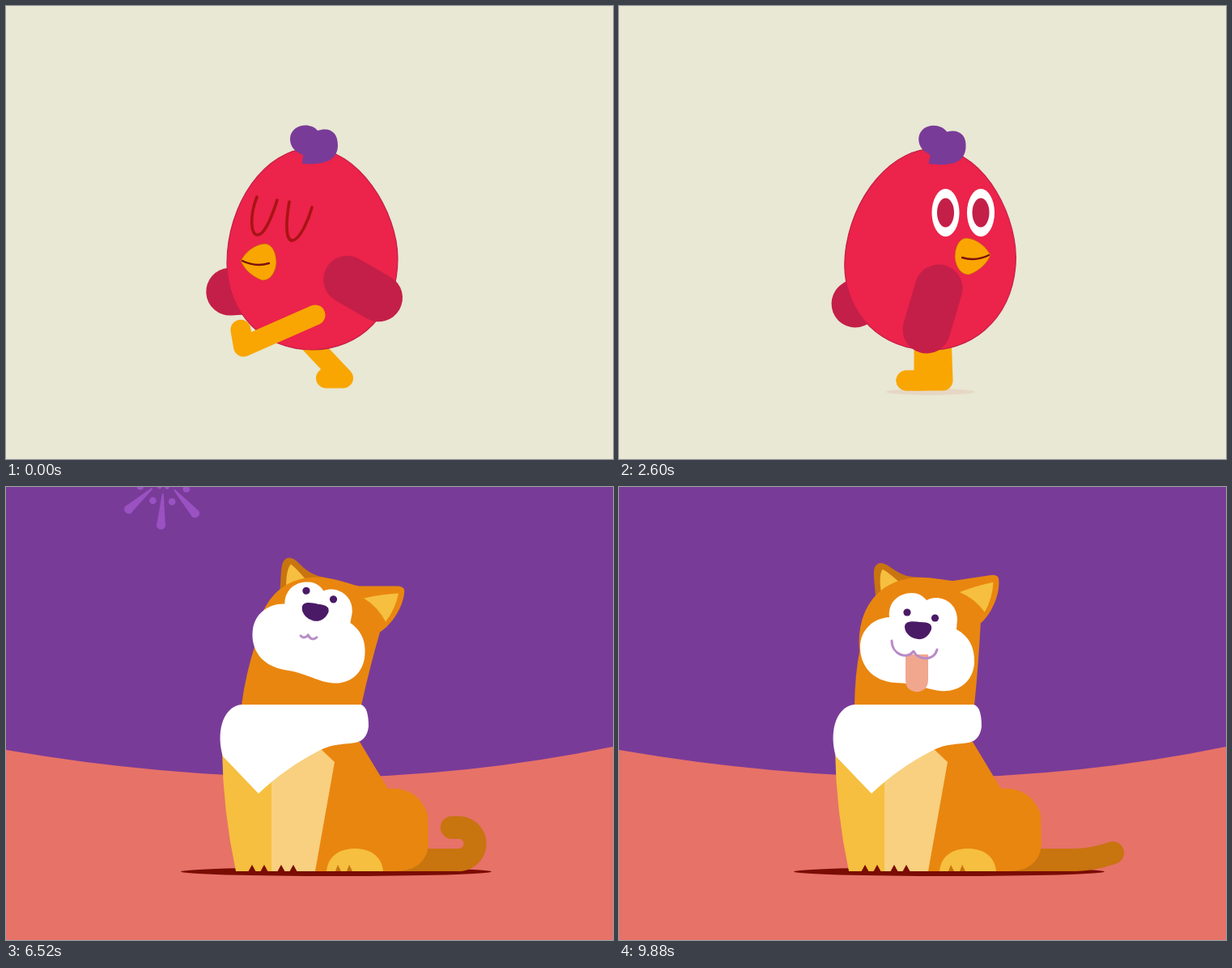
An HTML page with a canvas that plays this animation: 750 by 560 pixels, repeating every 9920 ms.

```html
<!DOCTYPE html>
<html lang="en">
<head>
<meta charset="utf-8">
<title>Bird and dog</title>
<style>
html, body { margin: 0; width: 100%; height: 100%; overflow: hidden; background: #e8e8d4; }
canvas { display: block; }
</style>
</head>
<body>
<canvas id="stage" width="750" height="560"></canvas>
<script>
const LOOP = 9920, STEP = 40, TAU = Math.PI * 2;
const { sin, cos, min, max, abs, sqrt, PI } = Math;
const ctx = document.getElementById('stage').getContext('2d');
const C = {
  cream: '#e8e8d4', red: '#ec234a', wine: '#c41f48', yellow: '#f9a602', purple: '#793b98',
  line: '#a81414', coral: '#e77268', orange: '#e9860f', brown: '#c8740f', gold: '#f6bf3f',
  sand: '#f8d07f', blood: '#7a0c04', spark: '#9a52c2', plum: '#4a1a66', pink: '#f1a78d',
  drop: '#6a2088'
};

const clamp = v => max(0, min(1, v));
const lerp = (a, b, k) => a + (b - a) * k;
const mix = (a, b, k) => a.map((v, i) => lerp(v, b[i], k));
const span = (t, a, b) => clamp((t - a) / (b - a));
function ease(t, a, b) {
  const k = span(t, a, b);
  return k * k * (3 - 2 * k);
}
// Goes from 0 to 1 with a damped overshoot, starting at time a.
function spring(t, a) {
  const d = t - a;
  return d < 0 ? 0 : 1 - Math.exp(-d / 110) * cos(d / 80);
}

function fill(color, d) {
  ctx.fillStyle = color;
  ctx.fill(new Path2D(d));
}
function stroke(color, width, d) {
  ctx.strokeStyle = color;
  ctx.lineWidth = width;
  ctx.stroke(new Path2D(d));
}
function oval(color, x, y, rx, ry = rx) {
  ctx.fillStyle = color;
  ctx.beginPath();
  ctx.ellipse(x, y, max(0, rx), max(0, ry), 0, 0, TAU);
  ctx.fill();
}
function group(draw) {
  ctx.save();
  draw();
  ctx.restore();
}
function turn(x, y, deg, sx = 1, sy = 1) {
  ctx.translate(x, y);
  ctx.rotate(deg * PI / 180);
  ctx.scale(sx, sy);
  ctx.translate(-x, -y);
}

/* Bird */

// Ankle and toe of a walking leg; phase 0 is the heel strike.
function stride(phase) {
  const a = TAU * phase, c = cos(a), s = sin(a), c2 = cos(2 * a);
  const x = 364 - 61.5 * c + 8 * s - 9 * c2;
  const y = min(463, 438 - 19.5 * c + 27.5 * s + 2.5 * c2);
  const lift = max(0, -s);
  const toe = PI + 1.4 * max(0, c) ** 4 - 3 * lift * lift, len = 21 - 6 * lift;
  return { lift, foot: [x, y, x + len * cos(toe), y + len * sin(toe)] };
}

function birdPose(t) {
  const p = min(t, 1280) / 640, w = cos(TAU * p - .48);
  const near = stride(p), far = stride(p + .5);
  const stand = ease(t, 1280, 1480), back = spring(t, 3160);
  const wind = sin(PI * span(t, 1280, 1960)), side = 1 - 2 * back;
  const rot = cos(2 * TAU * p) - 1 + 5 * spring(t, 1800) - 10 * back - 12 * wind;
  const angle = .96 - .49 * w, reach = 52 - 8 * w;
  const sx = 411 + 12 * w, sy = 343.5 - 6 * w;
  return {
    rot, dx: -.7 * rot, bob: -5 * sin(2 * TAU * p),
    face: -1 + 2 * ease(t, 1760, 2000) - 2 * ease(t, 3160, 3400),
    open: span(t, 1640, 1800),
    near: mix([382 + 10 * near.lift, 382 + 15 * near.lift, ...near.foot],
      [398, 405, 400, 463, 355, 463], stand),
    far: mix([362, 402, ...far.foot], [377, 405, 377, 463, 355, 463], stand),
    wing: mix([sx, sy, sx + reach * cos(angle), sy + reach * sin(angle)],
      [375 + 20 * side, 349, 375 + 5 * side, 400], stand),
    back: mix([324, 350, 303 - 29.6 * w, 392.5 - 44.4 * w],
      [375 - 55 * side, 350, 375 - 83 * side - 50 * wind, 368 - 106 * wind], stand)
  };
}

const leg = ([hx, hy, ax, ay, tx, ty]) =>
  stroke(C.yellow, 25, `M${hx} ${hy}L${ax} ${ay}L${tx} ${ty}`);
const wing = ([ax, ay, bx, by]) => stroke(C.wine, 59, `M${ax} ${ay}L${bx} ${by}`);

function birdFace(p) {
  const lean = p.rot - 5 * p.face * p.open;
  group(() => {
    ctx.translate(374.5 + lean * 2, p.face * lean * 1.3 + p.bob - 7 * p.open);
    ctx.scale(-p.face, 1);
    ctx.translate(-374.5, 0);
    if (p.open > 0) {
      for (const x of [302, 345.5]) {
        oval('#fff', x, 262.5, 17, 29.5 * p.open);
        oval(C.wine, x, 262.5, 10.5, 18 * p.open);
      }
    } else {
      stroke(C.line, 3.6, 'M310 236C300 262 303 283 311 283C320 283 330 256 335 240' +
        'M350 242C345 272 346 290 354 290C363 289 374 264 378 249');
    }
    const beak = 'M290 315C296 303 310 293 322 294C332 297 334 310 334 318' +
      'C333 330 326 340 316 339C303 334 294 325 290 315Z';
    fill(C.yellow, beak);
    stroke('#c8571c', .8, beak);
    stroke('#7a1010', 2.4, 'M292 315Q308 323 325 318');
  });
}

function bird(t) {
  const p = birdPose(t), striding = t < 1400;
  const swell = ease(t, 4720, 4960), tense = span(t, 4200, 4700);
  const squeeze = .07 * sin(span(t, 4200, 4720) * TAU);
  const sx = 1 + .48 * swell + squeeze, sy = 1 + .12 * swell - squeeze;
  if (t >= 200) oval('rgba(230,200,184,.5)', 385, 477, 55, 4);
  group(() => {
    turn(380, 425, 0, lerp(1, sx, .3), 1);
    leg(p.far);
    if (!striding) leg(p.near);
  });
  group(() => {
    ctx.translate(sin(t / 13) * 3 * tense - 9 * swell, 0);
    turn(380, 425, 0, sx, sy);
    wing(p.back);
    group(() => {
      ctx.translate(p.dx, p.bob);
      turn(380, 425, p.rot);
      const egg = 'M377 176C436 176 484 255 484 312C484 380 437 425 378 425' +
        'C318 425 273 380 273 318C273 245 320 176 377 176Z';
      fill(C.red, egg);
      stroke(C.wine, 1.2, egg);
      fill(C.purple, 'M366 195L367 184C355 180 351 172 351 164C352 146 376 143 385 154' +
        'C400 149 410 156 410 172C410 190 395 197 366 195Z');
    });
    birdFace(p);
    if (striding) leg(p.near);
    wing(p.wing);
  });
}

/* Burst */

function yolk(x, y, sx, sy) {
  group(() => {
    ctx.translate(x, y);
    ctx.scale(sx, sy);
    fill('#fbbb40', 'M0-35C20-36 33-18 33 0C33 20 24 36 5 35C-18 35-32 20-32 0C-32-20-18-34 0-35Z');
    stroke('#e08a1a', 2, 'M-13 3C-12 17-5 25 7 24M-20-12Q-23-2-20 8');
  });
}

// Shell ring that opens towards the upper right.
function shell(k) {
  const r = lerp(158, 176, k);
  ctx.fillStyle = C.red;
  ctx.beginPath();
  for (let a = 0; a < TAU; a += .05) {
    const d = r + abs(sin(a * 7 + 1)) ** 5 * 70 * sin(k * PI);
    ctx.lineTo(365 + d * cos(a), 285 + d * .9 * sin(a));
  }
  ctx.fill();
  oval(C.cream, lerp(372, 378, k), lerp(290, 258, k), 180 * sqrt(k), 168 * sqrt(k));
}

function crescent() {
  fill(C.red, 'M482 379Q445 404 400 414Q350 425 318 414Q282 390 250 340Q241 343 251 372' +
    'L232 372L216 382Q235 400 255 410Q310 440 355 440Q400 438 435 418Q465 402 482 379Z');
  for (const [x, y] of [[225, 304], [213, 322], [202, 340], [206, 371]]) {
    const bx = 250 - x, by = 392 - y, d = Math.hypot(bx, by);
    const nx = by / d * 8, ny = -bx / d * 8, mx = x + bx * .35, my = y + by * .45;
    fill(C.red, `M${x} ${y}Q${mx + nx} ${my + ny} ${250 + nx} ${392 + ny}` +
      `L${250 - nx} ${392 - ny}Q${mx - nx} ${my - ny} ${x} ${y}Z`);
  }
  fill(C.red, 'M239 298Q234 322 242 333Q247 326 239 298ZM218 232Q206 254 209 265Q214 262 218 232Z' +
    'M283 238Q264 250 262 263Q270 250 283 238Z');
  stroke('#dc6f96', 2.4, 'M400 192H414');
}

function burst(t) {
  const fall = span(t, 5400, 5640), u = (t - 4960) / 440, dry = 1 - span(t, 5560, 5800);
  ctx.fillStyle = 'rgba(232,205,190,.5)';
  ctx.fillRect(328 - 123 * dry, 468, 246 * dry, 11);

  if (t < 5240) shell(span(t, 4960, 5240));
  else if (fall < 1) {
    group(() => {
      turn(345, 472, 0, lerp(1, .8, fall), 1 - fall);
      crescent();
    });
  }
  oval(C.red, 330, 472, 64 * span(t, 5160, 5360) * dry, 4);

  for (let i = 0; i < 8; i++) {
    const n = i % 4, right = i > 3;
    const x = right ? 498 + 25.5 * n : 120 + 20 * n;
    const y = (right ? 420 : 389) - 24 * sin(n * 1.1);
    const px = lerp(375, x, sqrt(u)), py = lerp(300, y, u) - 480 * u * (1 - u);
    if (py < 472) oval(C.drop, px, py, right ? 2.2 : 1.5, right ? 6 : 3);
  }
  const wet = span(t, 5240, 5360) * dry;
  for (let i = 0; i < 3; i++) oval(C.drop, 110 + 45 * i, 475.5, (9 + 18 * (i % 2)) * wet, 1.4);
  oval(C.drop, 570, 478, 38 * wet, 1);
}

function egg(t) {
  const pop = span(t, 4960, 5280), drop = span(t, 5560, 5760), squash = span(t, 5720, 5840);
  const size = 1 + .5 * (1 - pop) * cos(pop * 9);
  yolk(377, lerp(243, 442, drop * drop), size * (1 + squash), size * (1 - .7 * squash));
}

/* Dog */

function firework(t, x, y, start) {
  const p = (t - start) / 1120;
  if (p <= 0 || p >= 1) return;
  const r = 86 * p ** .3, gap = r * min(1, p * 1.1), inner = 45 * p;
  const shrink = 1 - span(p, .75, 1);
  const ray = (a, from, to, half) => group(() => {
    ctx.translate(x, y);
    ctx.rotate(a);
    fill(C.spark, `M${from} -1L${to} ${-half}V${half}L${from} 1Z`);
    if (p < .45) oval(C.spark, to - 1, 0, half * .9, half);
  });
  for (let i = 0; i < 8; i++) {
    const a = i * TAU / 8 + .06, b = a + TAU / 16;
    ray(a, gap, r, 5.5 * shrink);
    ray(b, inner * .3, inner, 2.4 * shrink);
    const d = r * lerp(.45, .68, p);
    oval(C.spark, x + d * cos(b), y + d * sin(b), 3 + 4.5 * min(p, .5) * shrink);
  }
  oval(C.spark, x, y, 2.5 * shrink);
}

// Walks along the tail; its heading either curls up or stays nearly flat.
function tail(t) {
  const flat = spring(t, 9080), length = lerp(71, 52, flat);
  const wag = .1 * sin((t - 6520) / 250 * PI);
  let x = 560, y = 461, d = `M470 461L${x} ${y}`;
  for (let s = 1; s <= length; s++) {
    const heading = lerp(min(PI, s / 20) + wag * s / length, .35 * s / length, flat);
    x += cos(heading);
    y -= sin(heading);
    d += `L${x} ${y}`;
  }
  stroke(C.brown, 28, d);
}

// up: gaze towards the sky, happy: head tilted with the tongue out
function dogHead(t) {
  const up = 1 - ease(t, 7300, 7700), happy = ease(t, 9200, 9520);
  const nod = sin((t - 6520) / 500 * PI) * (1 - happy);
  const tilt = -8.5 * happy, hx = 9 * up - 5 * happy + nod, hy = 1.5 * up + 2.5 * happy;
  const at = (x, y) => {
    const a = tilt * PI / 180, dx = x - 372, dy = y - 180;
    return [372 + hx + dx * cos(a) - dy * sin(a), 180 + hy + dx * sin(a) + dy * cos(a)];
  };
  group(() => {
    ctx.translate(hx, hy);
    turn(372, 180, tilt);
    fill(C.brown, 'M329 132C331 112 330 96 334 90Q340 82 350 90C362 102 370 108 388 111Z');
    fill(C.gold, 'M337 124Q337 100 343 94Q349 98 364 116Z');
    fill(C.orange, 'M300 190C302 150 325 110 375 110C395 110 410 117 427 121L476 121Q485 122 483 130' +
      'C481 148 468 168 453 178Z');
    fill(C.gold, 'M433 136Q455 131 476 130Q472 150 460 165Q450 146 433 136Z');
  });
  fill(C.orange, `M291 270Q${293 + hx * .3} 232 ${at(300, 190)}L${at(375, 150)}L${at(453, 178)}` +
    `Q${446 + hx * .4} 222 439 270Z`);
  group(() => {
    ctx.translate(4 * up - 3 * happy, nod - 15 * up - 2 * happy);
    turn(372, 194, 6 * up);
    fill('#fff', 'M337 163C335 145 348 133 365 133C374 133 380 138 383 142C397 134 420 142 421 165' +
      'L420 178C435 186 443 200 442 220C440 245 420 256 400 254C378 251 370 245 345 244' +
      'C315 242 301 222 301 200C301 178 318 164 337 163Z');
  });
  group(() => {
    const drop = 9 * up;
    ctx.translate(8.5 * up - 6 * happy, nod * 1.6 - 25 * up);
    turn(379, 158.5, 6 * up);
    oval(C.plum, 362, 155, 4.6);
    oval(C.plum, 396.5, 162, 4.6);
    ctx.translate(0, drop / 3);
    fill(C.plum, 'M359 173C359 165 370 166 378 167C390 167 393 170 392 176' +
      'C389 184 383 189 375 188C366 187 359 180 359 173Z');
    ctx.translate(0, drop * 2 / 3);
    if (up < 1) {
      const out = happy * (1 + .1 * sin((t - 9880) / 120 * PI));
      const y = 210 + 29 * out, tip = y + 4 + 15 * out;
      fill(C.pink, `M360 207H388V${y}C388 ${tip} 360 ${tip} 360 ${y}Z`);
    }
    const m = mix([343, 190, 343, 207, 362, 214, 370, 203, 375, 214, 395, 216, 399, 201],
      [361, 202, 364, 205, 368, 204, 370, 200, 373, 205, 377, 206, 381, 202], up);
    stroke('#b88cc6', 3, `M${m.slice(0, 2)}C${m.slice(2, 8)}C${m.slice(8)}`);
  });
}

function dog(t) {
  const k = span(t, 5800, 6240);
  if (k <= 0) return;
  const grow = 1 - (1 - k) ** 3 * cos(k * 9);
  oval(C.blood, 408, 475.5, 192 * min(1, k * 3), 5.5);
  group(() => {
    turn(400, 475, 0, lerp(1.3, 1, min(1, grow)), max(.02, grow));
    tail(t);
    fill(C.orange, 'M340 315H437L472 373Q508 370 521 404L522 443Q518 475 480 475H340Z');
    dogHead(t);
    fill(C.gold, 'M267 325Q268 400 284 475H329V335Z');
    fill(C.sand, 'M328 345V475H382L406 340L388 323Z');
    fill(C.gold, 'M396 475C398 456 412 447 431 447C450 447 464 456 466 475Z');
    for (const x of [304, 319, 340, 355]) fill(C.blood, `M${x - 5} 476L${x} 467L${x + 5} 476Z`);
    for (const x of [411, 425]) fill(C.brown, `M${x - 4} 475L${x - 1} 467L${x + 3} 475Z`);
    fill('#fff', 'M290 269H438Q448 271 448 296Q446 313 432 316C412 319 404 317 385 327' +
      'C360 340 335 357 312 379L268 333C260 306 266 273 290 269Z');
  });
}

function night(t) {
  const open = span(t, 5560, 5880);
  if (open <= 0) return;
  group(() => {
    ctx.beginPath();
    ctx.arc(377, 280, 490 * open * open, 0, TAU);
    ctx.clip();
    ctx.fillStyle = C.purple;
    ctx.fillRect(0, 0, 750, 560);
    ctx.translate(0, 240 * (1 - ease(t, 5680, 6080)));
    fill(C.coral, 'M0 325Q190 358 385 359.5Q570 358 750 321V560H0Z');
  });
  firework(t, 195, -11, 6190);
  firework(t, 84, 70, 7080);
  firework(t, 652, 20, 7880);
}

function draw(t) {
  ctx.fillStyle = C.cream;
  ctx.fillRect(0, 0, 750, 560);
  ctx.lineCap = ctx.lineJoin = 'round';
  if (t < 4960) return bird(t);
  if (t < 5880) burst(t);
  night(t);
  if (t < 5840) egg(t);
  dog(t);
}

const began = performance.now();
function tick() {
  const t = (performance.now() - began) % LOOP;
  draw(Math.floor(t / STEP) * STEP);
  requestAnimationFrame(tick);
}
tick();
</script>
</body>
</html>
```
